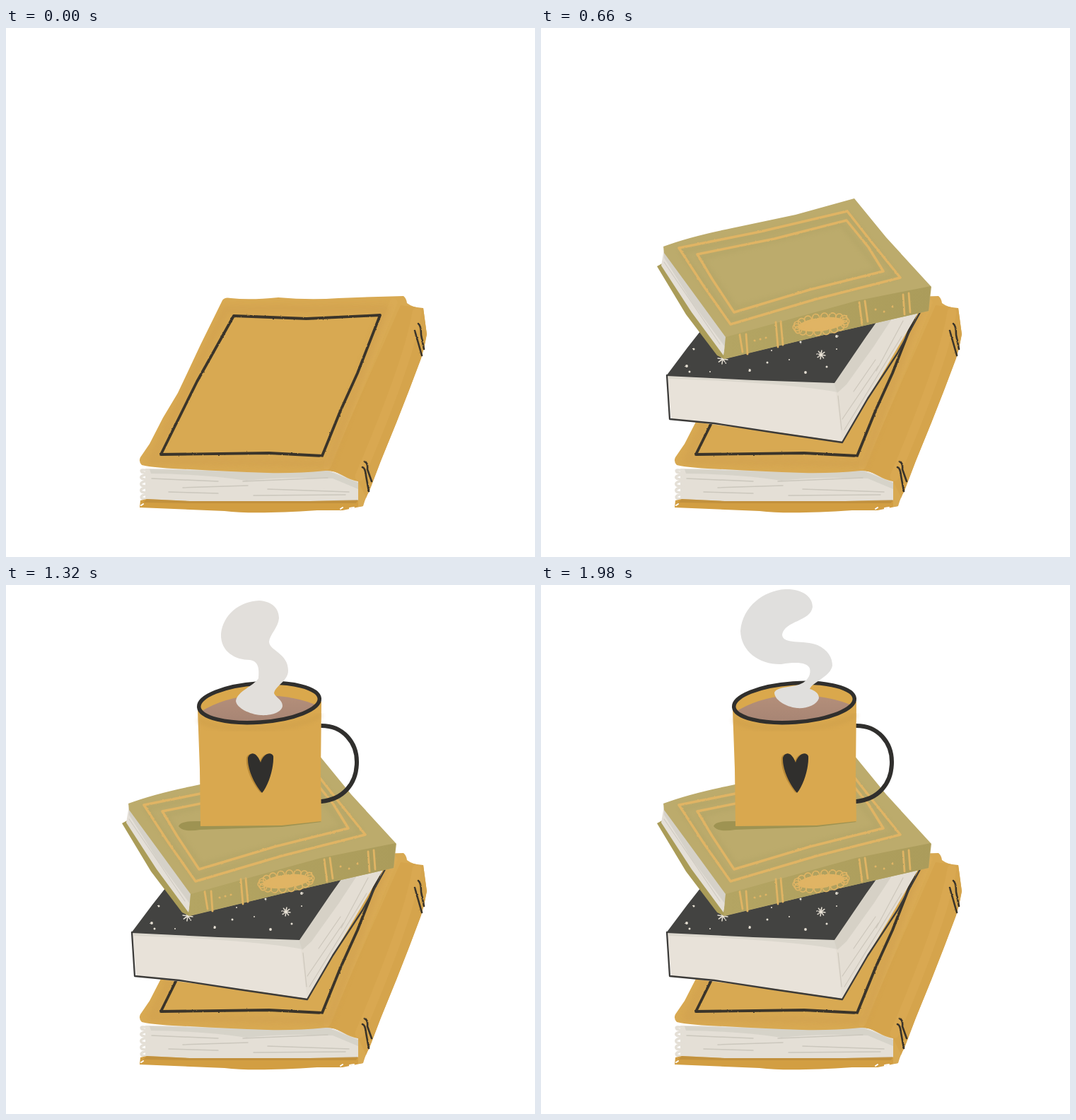
An HTML page that plays this animation: 748x748 px, repeating every 2.31 s.

```html
<!DOCTYPE html>
<html lang="en">
<head>
<meta charset="utf-8">
<title>Books and a hot drink</title>
<style>
  html, body { margin: 0; width: 100%; height: 100%; overflow: hidden; background: #fff; }
  svg { display: block; width: 100vw; height: 100vh; }
  .line { fill: none; stroke-linecap: round; stroke-linejoin: round; }
</style>
</head>
<body>
<svg viewBox="0 0 748 748">
  <defs>
    <filter id="chalk" filterUnits="userSpaceOnUse" x="0" y="0" width="748" height="748" color-interpolation-filters="sRGB">
      <feTurbulence type="fractalNoise" baseFrequency=".35" numOctaves="2" seed="7"/>
      <feDisplacementMap in="SourceGraphic" scale="2" xChannelSelector="R" yChannelSelector="G"/>
    </filter>
    <filter id="soft" x="-20%" y="-20%" width="140%" height="140%"><feGaussianBlur stdDeviation="3"/></filter>
    <linearGradient id="coffee" x1="0" y1="0" x2="0" y2="1">
      <stop stop-color="#b48f7a"/><stop offset="1" stop-color="#a58373"/>
    </linearGradient>
    <linearGradient id="oliveSpine">
      <stop stop-color="#b4a563"/><stop offset="1" stop-color="#ab9c5b"/>
    </linearGradient>
    <clipPath id="amberClip"><path id="amberShape" d="M306 385Q309 380 318 382Q345 385 385 381Q430 385 470 382Q520 380 562 379Q566 382 567 389Q576 396 590 396L595 433Q592 451 587 467L570 512L552 558L530 612L514 654Q508 665 505 676L498 677V641Q488 640 475 632Q463 625 452 626Q410 630 370 629Q310 627 260 624Q215 623 192 618Q187 613 190 607L203 588L222 551L243 516L275 448Z"/></clipPath>
    <clipPath id="mugClip"><ellipse cx="358" cy="166.500" rx="85" ry="27" transform="rotate(-4 358 166.500)"/></clipPath>
  </defs>

  <g id="amberBook">
    <path fill="#e4dfd6" d="M197 623L455 625L499 640V670L197 669Z"/>
    <path class="line" stroke="#e4dfd6" stroke-width="3.500" d="M202 626Q188 623 192 628L202 631Q187 633 192 637L202 640Q187 642 192 647L202 649Q187 651 192 656L202 658Q188 661 192 665L202 667"/>
    <path fill="#cfccc3" opacity=".65" d="M203 624L370 628L455 626L498 643V652L462 637Q390 634 340 640Q280 631 205 630Z"/>
    <path class="line" stroke="#cbc7bd" stroke-width="1.500" d="M206 637L300 641M250 650L342 647M230 656L300 658M335 641L455 636M370 652L485 656M350 661L480 660"/>
    <path fill="#d29e42" d="M190 668L199 666L260 669L360 669L430 669L498 668L505 676L476 682L440 682Q350 688 309 683L189 678Z"/>
    <path fill="#b7873a" opacity=".55" d="M199 666L260 669H430L498 667L495 672H260L194 671Z"/>
    <path class="line" stroke="#fff" stroke-width="2" d="M191 675L194 673M473 680L476 678M486 679L492 678"/>
    <use href="#amberShape" fill="#d8a952"/>
    <g clip-path="url(#amberClip)">
      <path fill="#d5a44c" d="M558 392L592 396L600 440L512 670L498 641L455 625Z"/>
      <path class="line" stroke="#dcad57" stroke-width="11" opacity=".6" d="M548 388L454 619"/>
      <path class="line" stroke="#d9a851" stroke-width="13" d="M581 402Q570 470 500 634"/>
      <path class="line" stroke="#d0a050" stroke-width="11" opacity=".55" filter="url(#soft)" d="M311 398L536 397L456 616L206 611Z"/>
    </g>
    <g class="line" filter="url(#chalk)" stroke="#3a342a">
      <path stroke-width="3.800" d="M322 407L425 411L529 406L497 488L473 541L447 605L372 601L219 603L270 500Z"/>
      <path stroke-width="2.600" d="M583 418Q587 421 587 434L591 454M578 428L588 463M507 613Q512 615 511 624L517 641M504 621Q508 622 509 633L513 655"/>
    </g>
  </g>

  <g id="nightBook">
    <path fill="#e8e2d9" d="M179 491L415 500L520 349L527 351L538 394L426 585L330 571L184 553Z"/>
    <path fill="#e4ded4" d="M415 501L523 350L538 394L426 585Z"/>
    <path fill="#cdcabf" opacity=".6" d="M414 501L520 351L516 381L470 451L432 504L419 516Z"/>
    <path fill="#d4d0c6" opacity=".6" d="M181 493L415 501L419 515Q340 501 181 496Z"/>
    <path class="line" stroke="#cdc7bc" stroke-width="1.200" d="M426 553L477 478M429 568L510 436M442 514L473 469M474 485L512 414M420 520L425 568"/>
    <path id="nightCover" d="M297 324L350 329L420 338L520 347L492 391L460 436L415 502L300 498L177 492L207 452L240 410Z"/>
    <path class="line" stroke="#3c3b39" stroke-width="2.300" d="M178 491L182 553L245 559L330 572L426 586L462 524L504 460L541 393"/>
    <g filter="url(#chalk)" fill="#e7e1d5">
      <path d="M311 358C312 378 325 405 362 411C393 411 413 395 416 374C408 385 389 394 364 395C337 392 322 379 311 358Z"/>
      <g id="dots"></g>
      <path id="stars" class="line" stroke="#e7e1d5" stroke-width="1.500"/>
    </g>
  </g>

  <g id="oliveBook">
    <path fill="#aa9c58" d="M164 337L173 332L264 462L259 468L249 463L205 405Z"/>
    <path fill="#e4dfd7" d="M174 312L264 436L258 463L213 402L170 336Z"/>
    <path fill="#ccc8bf" opacity=".6" d="M174 312L264 436L261 452L215 390L174 325Z"/>
    <path class="line" stroke="#d0cbc2" stroke-width="1.300" d="M174 331L215 391L253 447"/>
    <path fill="#bcab6c" d="M173 309Q210 295 270 283L360 264L443 241L488 296L552 366L548 400L400 434L260 468L261 437L215 374L174 318Z"/>
    <path fill="url(#oliveSpine)" d="M261 437L340 415L445 386L551 365L548 400L400 434L258 468Z"/>
    <path class="line" stroke="#a99d60" stroke-width="6" opacity=".35" filter="url(#soft)" d="M198 316L310 292L433 264L502 350L390 379L268 413ZM225 325L425 277L478 342L275 397Z"/>
    <g class="line" filter="url(#chalk)" stroke="#e0b464" stroke-width="3.500">
      <path d="M195 311L310 288L433 259L470 306L508 353L390 383L268 419L230 365ZM221 320L330 298L432 272L463 310L484 344L380 370L273 402L242 355Z"/>
      <path stroke-width="2.800" d="M281 434L285 458M290 433L292 461M332 416L335 451M339 415L342 448M450 388L454 419M458 386L462 415M512 377L514 405M520 375L522 402"/>
      <path stroke-width="3" d="M302 442h.1M310 440h.1M318 438h.1M473 398h.1M485 401h.1M497 394h.1"/>
      <g transform="rotate(-7 396 419)">
        <ellipse cx="396" cy="419" rx="33" ry="9.500" fill="#e0b464" stroke="none"/>
        <g id="loops" stroke-width="1.600"></g>
      </g>
    </g>
  </g>

  <g id="mug">
    <path fill="#9e9352" d="M244 341Q246 333 275 334L440 331L446 335L390 342L275 346Q249 350 244 341Z"/>
    <path class="line" stroke="#302f2d" stroke-width="6" d="M446 199C477 199 496 223 496 250C496 282 476 303 446 306"/>
    <path fill="#d9a84f" d="M271 176L446 165L445 270L446 334L390 340L275 341L274 260Z"/>
    <path class="line" stroke="#c99b48" stroke-width="7" opacity=".45" filter="url(#soft)" d="M275 192Q300 204 345 203Q410 203 443 185"/>
    <g clip-path="url(#mugClip)">
      <rect x="270" y="130" width="180" height="75" fill="#daa84c"/>
      <path fill="url(#coffee)" d="M274 180Q310 157 358 156Q407 155 444 172L430 200H285Z"/>
    </g>
    <ellipse cx="358" cy="166.500" rx="85.500" ry="27.500" transform="rotate(-4 358 166.500)" fill="none" stroke="#302f2d" stroke-width="5.500"/>
    <path id="heartShadow" fill="#b98a38" d="M360 294C350 283 338 261 340 244C343 236 353 237 358 252C361 239 372 236 375 243C376 258 369 284 360 294Z"/>
    <path id="heart" fill="#302f2d" d="M362 294C352 283 341 261 342 244C345 236 354 235 360 251C364 238 375 235 378 242C379 258 371 284 362 294Z"/>
    <path id="steam"/>
  </g>
</svg>
<script>
const STEP = 330, STEPS = 7;
const $ = id => document.getElementById(id);

// Each cloud is one closed outline; the steam leans further with every step.
const steam = [
  ["#e4e1dc", "M352 26C372 27 385 38 386 50C386 62 379 70 379 78C381 90 401 100 401 121C400 140 387 150 386 163C388 172 386 177 380 181C365 184 340 183 327 176C320 165 322 150 330 140C334 134 339 128 339 122C330 108 306 98 306 72C307 45 328 27 352 26Z"],
  ["#e2dfdb", "M358 22C375 23 386 32 386 47C385 60 373 70 372 80C372 93 399 96 399 121C399 136 381 142 379 153C382 160 391 162 391 171C390 180 375 185 360 184C345 183 326 174 325 164C327 150 350 143 357 132C358 120 358 108 345 106C325 106 303 95 304 69C307 42 330 23 358 22Z"],
  ["#e1dfdc", "M350 18C369 17 380 27 381 41C380 58 358 62 355 72C358 82 399 75 399 109C398 127 384 135 382 146C387 150 395 153 395 161C394 172 375 178 360 178C344 178 328 168 328 157C330 146 345 146 358 140C370 134 374 124 371 113C362 102 330 106 314 98C298 90 293 82 293 70C296 42 320 20 350 18Z"],
  ["#e0dfdd", "M345 6C367 5 384 15 384 31C381 52 345 50 341 70C341 85 372 77 391 85C406 92 412 103 412 114C409 130 384 137 380 147C387 149 393 153 393 160C390 170 375 175 362 174C345 172 330 162 330 152C335 142 358 146 371 138C378 133 382 126 380 118C377 110 362 108 340 112C310 113 283 95 282 65C285 30 315 8 345 6Z"]
];

const dots = [[300, 337], [312, 341], [350, 337], [353, 349], [431, 349], [347, 365], [369, 376],
  [425, 376], [482, 364], [474, 347], [276, 390], [289, 389], [253, 426], [268, 427], [216, 454],
  [246, 443], [206, 478], [210, 486], [239, 486], [295, 484], [320, 473], [326, 456], [338, 425],
  [367, 444], [351, 469], [374, 487], [404, 479], [418, 454], [418, 436], [406, 420], [371, 408],
  [345, 420], [433, 394], [461, 394], [440, 408], [418, 423]];
const stars = [[391, 358, 6], [459, 380, 6], [285, 408, 6], [257, 468, 7], [396, 462, 6], [292, 431, 2.5]];

const circle = (x, y, r) => `<circle cx="${x}" cy="${y}" r="${r}"/>`;
const spokes = ([x, y, r]) => [0, 1, 2, 3].map(i => {
  const a = i * Math.PI / 4 + .15, dx = r * Math.cos(a), dy = r * Math.sin(a);
  return `M${x - dx} ${y - dy}L${x + dx} ${y + dy}`;
}).join("");

$("dots").innerHTML = dots.map(([x, y], i) => circle(x, y, [1, 1.5, 1.9][i * 5 % 3])).join("");
$("stars").setAttribute("d", stars.map(spokes).join(""));
$("loops").innerHTML = Array.from({ length: 18 }, (_, i) => {
  const a = i / 18 * 2 * Math.PI;
  return circle(396 + 35 * Math.cos(a), 419 + 10.5 * Math.sin(a), 5);
}).join("");

const show = (id, on) => $(id).setAttribute("display", on ? "inline" : "none");

function draw(time) {
  const step = Math.floor(time / STEP) % STEPS;
  show("nightBook", step >= 1);
  show("oliveBook", step >= 2);
  show("mug", step >= 3);
  $("nightCover").setAttribute("fill", step === 1 ? "#494847" : "#434341");
  if (step >= 3) {
    const [color, outline] = steam[step - 3];
    $("steam").setAttribute("fill", color);
    $("steam").setAttribute("d", outline);
  }
}

const start = performance.now();
function tick() {
  draw(performance.now() - start);
  requestAnimationFrame(tick);
}
draw(0);
tick();
</script>
</body>
</html>
```
